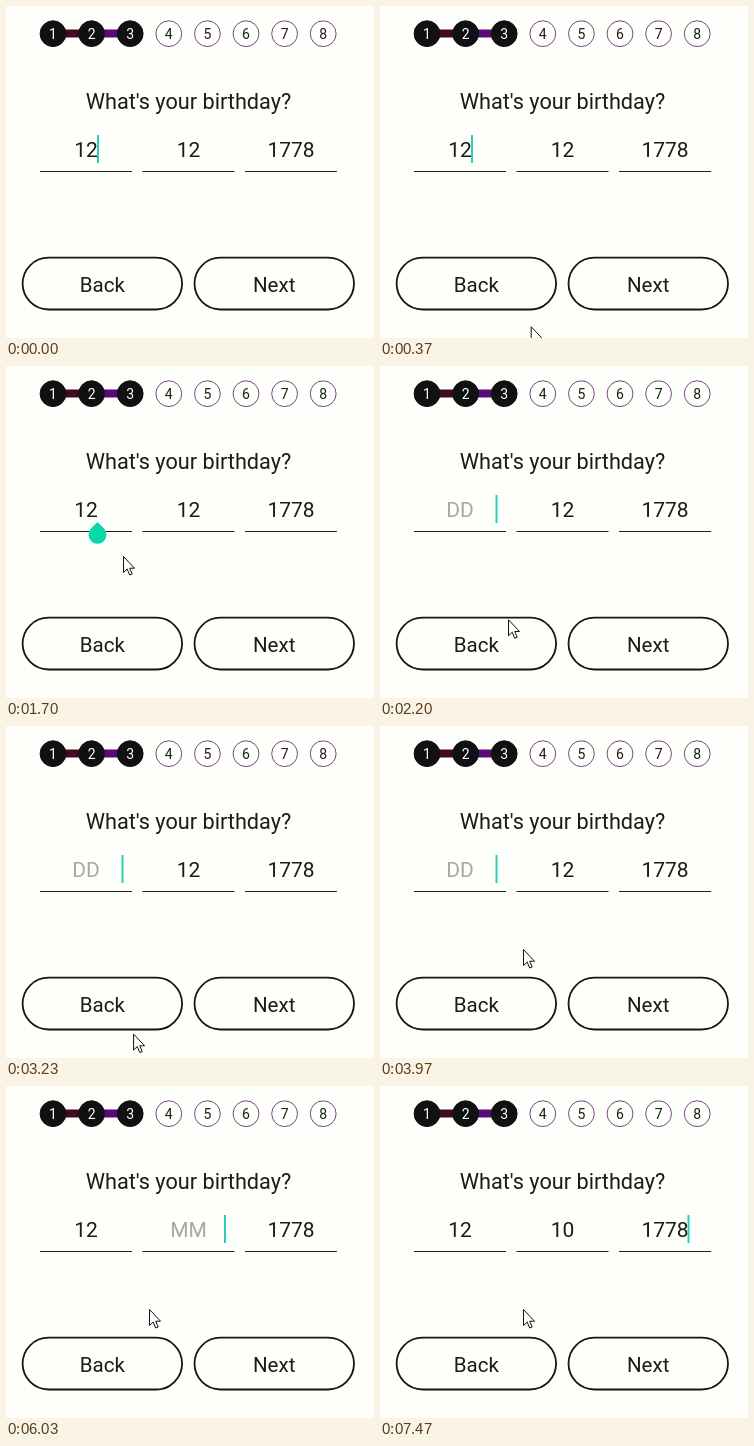
Animation of 368 by 332 pixels, one loop 8 s. Source, as an HTML page:

```html
<!DOCTYPE html>
<html lang="en">
<head>
<meta charset="utf-8">
<title>Birthday form</title>
<style>
  html, body { margin: 0; width: 100%; height: 100%; overflow: hidden; background: #fefefb; }
  svg { display: block; width: 368px; height: 332px; }
  text { font: 21px Roboto, sans-serif; text-anchor: middle; fill: #1b1b18; }
  .title { font-size: 21.7px; }
  .button text { font-size: 20.5px; }
  .button rect { fill: none; stroke: #151515; stroke-width: 1.8; }
  .step text { font-size: 14px; }
  .step circle { fill: #fefefb; stroke: #76467e; stroke-width: 1; }
  .done circle { fill: #111114; stroke: #111114; }
  .done text { fill: #fff; }
  .hint { fill: #aaa99a; }
</style>
</head>
<body>
<svg id="stage" viewBox="0 0 368 332"></svg>
<script>
const LOOP = 8000;
const CENTERS = [80, 182.5, 285];
const HINTS = ["DD", "MM", "YYYY"];
const DIGIT_WIDTH = 11.5;
const EMPTY_CARET_OFFSET = 36;

// [time, focused field, day, month]; every edit restarts the caret blink
const EDITS = [
  [0, 0, "12", "12"],
  [1200, 0, "12", "12"],
  [1800, 0, "1", "12"],
  [1930, 0, "", "12"],
  [4800, 0, "1", "12"],
  [4900, 0, "12", "12"],
  [4940, 1, "12", "12"],
  [5700, 1, "12", "1"],
  [5890, 1, "12", ""],
  [6930, 1, "12", "1"],
  [7430, 1, "12", "10"],
  [7470, 2, "12", "10"]
];

// [time, x, y] of the pointer tip
const POINTER = [
  [30, 180, 334], [600, 131, 311], [870, 131, 311], [1200, 95, 150],
  [1470, 95, 150], [1680, 117, 190], [2100, 117, 190], [2200, 128, 253],
  [2400, 132, 309], [2930, 132, 309], [3070, 127, 308], [3230, 127, 308],
  [3430, 143, 223]
];

const stage = document.getElementById("stage");

function add(parent, tag, attributes, content = "") {
  const node = document.createElementNS("http://www.w3.org/2000/svg", tag);
  for (const name in attributes) node.setAttribute(name, attributes[name]);
  node.textContent = content;
  return parent.appendChild(node);
}

function addButton(x, label) {
  const group = add(stage, "g", { class: "button" });
  add(group, "rect", { x, y: 251.7, width: 159.5, height: 51.8, rx: 25.9 });
  add(group, "text", { x: x + 79.7, y: 286 }, label);
}

add(stage, "rect", { x: 47, y: 23.5, width: 39, height: 8, fill: "#420a20" });
add(stage, "rect", { x: 86, y: 23.5, width: 38, height: 8, fill: "#5a0a78" });
for (let i = 0; i < 8; i++) {
  const x = 47 + i * 38.6;
  const group = add(stage, "g", { class: i < 3 ? "step done" : "step" });
  add(group, "circle", { cx: x, cy: 27.7, r: 12.9 });
  add(group, "text", { x, y: 32.8 }, i + 1);
}

add(stage, "text", { class: "title", x: 182.5, y: 103.3 }, "What's your birthday?");
const fields = CENTERS.map(x => {
  add(stage, "rect", { x: x - 46, y: 165, width: 92, height: 1, fill: "#222218" });
  return add(stage, "text", { x, y: 151.2 });
});
addButton(16.6, "Back");
addButton(188.5, "Next");

const caret = add(stage, "rect", { y: 129, width: 2, height: 28, fill: "#2fcdb4" });
const handle = add(stage, "path", {
  d: "M91.5 156 L98 162.5 A9 9 0 1 1 85 162.5 Z", fill: "#08d8aa"
});
const pointer = add(stage, "path", {
  d: "M.5 .5V16.5L4.2 13L6.7 19L9.2 18L6.7 12.2H11.5Z",
  fill: "#fff", stroke: "#111", "stroke-width": 1, "stroke-linejoin": "round"
});

function pointerAt(time) {
  const next = POINTER.findIndex(key => key[0] > time);
  if (next < 0) return POINTER[POINTER.length - 1].slice(1);
  if (next === 0) return POINTER[0].slice(1);
  const [t0, x0, y0] = POINTER[next - 1];
  const [t1, x1, y1] = POINTER[next];
  const p = (time - t0) / (t1 - t0);
  return [x0 + (x1 - x0) * p, y0 + (y1 - y0) * p];
}

function render(time) {
  const [start, focus, day, month] = EDITS.filter(edit => edit[0] <= time).pop();
  const values = [day, month, "1778"];
  fields.forEach((field, i) => {
    field.textContent = values[i] || HINTS[i];
    field.setAttribute("class", values[i] ? "" : "hint");
  });

  const length = values[focus].length;
  const offset = length ? length * DIGIT_WIDTH / 2 : EMPTY_CARET_OFFSET;
  const caretOn = Math.floor((time - start) / 500) % 2 === 0;
  caret.setAttribute("x", CENTERS[focus] + offset - .5);
  caret.setAttribute("visibility", caretOn ? "visible" : "hidden");
  handle.setAttribute("visibility", time >= 1200 && time < 1800 ? "visible" : "hidden");
  pointer.setAttribute("transform", `translate(${pointerAt(time)})`);
}

function tick() {
  render(performance.now() % LOOP);
  requestAnimationFrame(tick);
}
tick();
</script>
</body>
</html>
```
